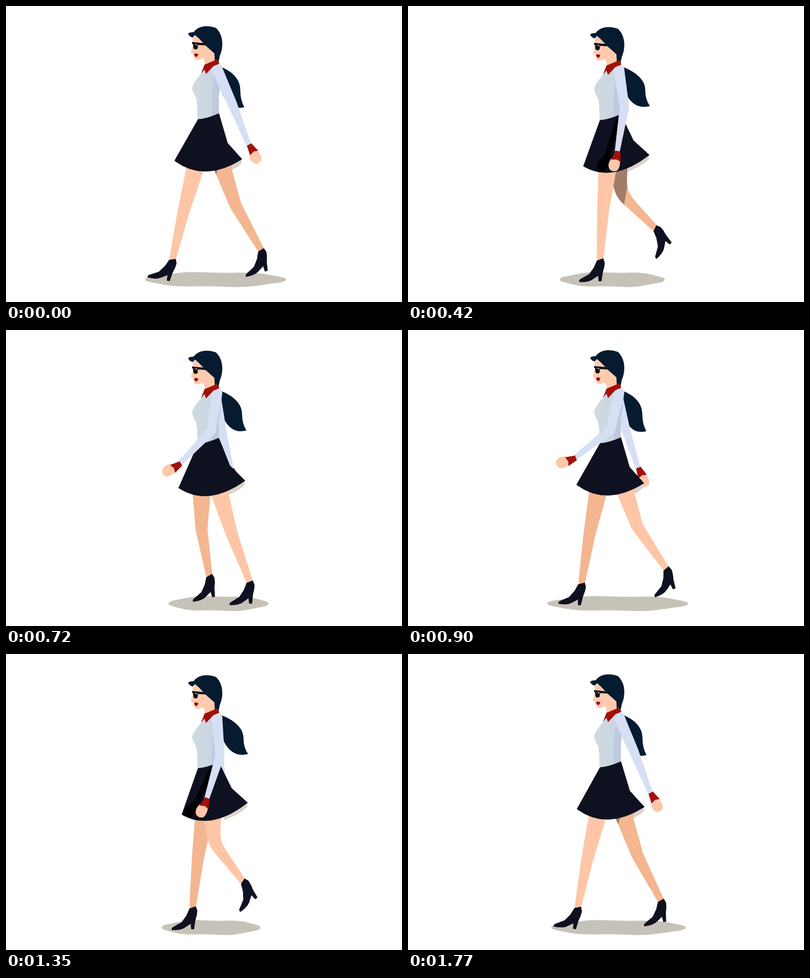
An HTML page with a canvas for the animation above (1800 ms loop, 800 px wide and 600 px high).

```html
<!DOCTYPE html>
<html lang="en">
<head>
<meta charset="utf-8">
<title>Walk cycle</title>
<style>
html, body { margin: 0; width: 100%; height: 100%; overflow: hidden; background: #fff; }
canvas { display: block; width: 800px; height: 600px; }
</style>
</head>
<body>
<canvas id="stage" width="800" height="600"></canvas>
<script>
const ctx = document.getElementById('stage').getContext('2d');
const { PI, sin, cos, hypot, atan2 } = Math;
const LOOP = 1800, STEP = 30, HIP_Y = 333, GROUND_Y = 514, FAR_LAG = 960;
const DEG = PI / 180;
const C = {
  ink: '#0e111f', hair: '#061a30', red: '#a21107', sleeve: '#d6dff4', shirtSide: '#bfc9df',
  face: '#fdcaae', nearSkin: '#fec6a6', farSkin: '#f4b690', hand: '#fdc7aa',
  legShade: '#a07c69', skirtShade: '#010104', ground: '#c7c2b8', hem: '#dad3ca'
};

const shapes = {
  boot: 'M-6 2 L6 -2 L9 6 L8 15 L5 26 L2.5 43.5 H-2.5 L-3.5 32 L-17 41 Q-25 46 -42 45 Q-43 41 -38 39 L-22 30 L-12 16 Z',
  cuff: 'M-4 -2 L6 -2 L11 18 L2 15 L-8 18 Z',
  hand: 'M-9 16 L9 14 Q13 29 8 37 Q-1 43 -8 37 Q-15 29 -9 16 Z',
  torso: 'M400 126 L393 139 Q376 158 376 167 Q377 175 384 186 Q387 200 387 232 L430 222 V180 Q436 145 436 126 L428 116 Z',
  shirtSide: 'M420 140 L416 180 V225 L430 222 V180 L434 150 Z',
  face: 'M384 58 L377 66 V83 L373 94 L378 97 L379 104 L383 109 H390 L398 106 L401 112 V122 L424 114 L422 90 L402 66 Z',
  lips: 'M380 97 L384 96 L389 98 L385 104 L381 101 Z',
  glasses: 'M376 73 L406 76 V80 L388 79 L387 86 Q386 88 383 88 Q379 88 378.5 84 L378 77 H376 Z',
  hair: 'M368 56 Q371 53 379 53 Q388 41 405 41 Q416 41 425 45 Q437 58 437 76 Q437 90 432 101 L429 116 L422 114 L421 96 L403 80 L390 66 L382 59 L377 64 Q369 61 368 56 Z',
  collar: 'M401 119 L427 108 L431 117 L419 122 L404 138 L401 129 L394 137 Z'
};
for (const name in shapes) shapes[name] = new Path2D(shapes[name]);

// Cosine that peaks at a given time.
const wave = (t, peak, period = LOOP) => cos(2 * PI * (t - peak) / period);

// Smooth hump from start to end, zero for the rest of the loop.
function hump(t, start, end) {
  const u = (((t - start) % LOOP) + LOOP) % LOOP / (end - start);
  return u < 1 ? sin(PI * u) ** 2 : 0;
}

function fill(path, color) {
  ctx.fillStyle = color;
  ctx.fill(path);
}

function ink(path) {
  fill(path, C.ink);
  ctx.strokeStyle = C.ink;
  ctx.lineWidth = 1;
  ctx.stroke(path);
}

function placed(x, y, angle, draw) {
  ctx.save();
  ctx.translate(x, y);
  ctx.rotate(angle);
  draw();
  ctx.restore();
}

// Unit vector at right angles to a-b.
function normal([ax, ay], [bx, by]) {
  const d = hypot(bx - ax, by - ay);
  return [(by - ay) / d, (ax - bx) / d];
}

const shift = ([x, y], [nx, ny], d) => [x + nx * d, y + ny * d];

// Stance carries the foot back, swing lifts it and bends the knee.
function pose(t) {
  const lift = 66 * hump(t, 640, 1740);
  const hip = [411 - 30 * wave(t, 50), HIP_Y];
  const x = 434 - 100 * wave(t, 150) + 12 * wave(t, 600) - 10 * wave(t, 150, LOOP / 2);
  const ankle = [x, GROUND_Y - lift];
  const k = 0.46 - 0.0022 * lift;
  const onLine = hip.map((v, i) => v + k * (ankle[i] - v));
  const knee = shift(onLine, normal(hip, ankle), -0.3 * lift - 2);
  const turn = 14 * hump(t, -160, 290) - 0.72 * lift;
  return { hip, knee, ankle, turn };
}

function legPath({ hip, knee, ankle }) {
  const n = normal(hip, ankle), m = normal(knee, ankle), p = new Path2D();
  const edge = s => [[hip[0] + 18 * s, HIP_Y], shift(knee, n, 12 * s), shift(ankle, m, 6.5 * s)];
  const [lh, lk, la] = edge(-1), [rh, rk, ra] = edge(1);
  p.moveTo(lh[0], HIP_Y - 15);
  p.lineTo(...lh);
  p.arcTo(...lk, ...la, 60);
  p.lineTo(...la);
  p.lineTo(...ra);
  p.arcTo(...rk, ...rh, 60);
  p.lineTo(...rh);
  p.lineTo(rh[0], HIP_Y - 15);
  p.closePath();
  return p;
}

function drawBoot({ ankle, turn }) {
  placed(...ankle, turn * DEG, () => ink(shapes.boot));
}

// Both joints swing like pendulums; angles in degrees from straight down.
function swingArm(shoulder, radius, upper, fore) {
  const reach = ([x, y], [length, angle]) =>
    [x + length * sin(angle * DEG), y + length * cos(angle * DEG)];
  const elbow = reach(shoulder, upper), wrist = reach(elbow, fore);
  const n = normal(shoulder, elbow), b = normal(shoulder, wrist), m = normal(elbow, wrist);
  const a = atan2(n[1], n[0]), path = new Path2D();
  path.arc(...shoulder, radius, a + PI, a + 2 * PI);
  path.lineTo(...shift(elbow, b, radius - 1.5));
  path.lineTo(...shift(wrist, m, 5));
  path.lineTo(...shift(wrist, m, -5));
  path.lineTo(...shift(elbow, b, 1.5 - radius));
  path.closePath();
  return { path, wrist, turn: -1.33 * fore[1] * DEG };
}

function drawArm(arm, shade) {
  fill(arm.path, shade || C.sleeve);
  placed(...arm.wrist, arm.turn, () => {
    fill(shapes.hand, shade || C.hand);
    fill(shapes.cuff, shade || C.red);
  });
}

// Ellipse with a rippled rim.
function drawGround(l, r) {
  const p = new Path2D();
  for (let a = 0; a < 2 * PI; a += PI / 40) {
    const rise = 15 * sin(a) * (1 + 0.08 * sin(6 * a + 1));
    p.lineTo((l + r) / 2 + (r - l) / 2 * cos(a), 554.5 + rise);
  }
  fill(p, C.ground);
}

function drawTail(s) {
  const p = new Path2D(), x = 473 + 7 * s, tip = 481 + 8.5 * s;
  p.moveTo(432, 123);
  p.bezierCurveTo(455, 131, x, 147, x, 170);
  p.quadraticCurveTo(x, 190, tip, 205 - 2.5 * s);
  p.bezierCurveTo(tip - 24, 212 - 2.5 * s, 441 + 4 * s, 196, 432 + 2.5 * s, 163);
  p.closePath();
  fill(p, C.hair);
}

function skirtPaths(s) {
  const [lx, ly, rx, ry, bob] = [340 + 16 * s, 313 + 13 * s, 476 + 12.5 * s, 311 - 10 * s, 2 * s];
  const skirt = new Path2D(), hem = new Path2D();
  skirt.moveTo(388, 230 + bob);
  skirt.quadraticCurveTo(405, 229 + bob, 430, 218 + bob);
  skirt.lineTo(447 + 9 * s, 278 - 6 * s);
  skirt.lineTo(rx, ry);
  skirt.quadraticCurveTo((lx + rx) / 2 - 8, (ly + ry) / 2 + 46, lx, ly);
  skirt.closePath();
  hem.moveTo(rx - 2, ry);
  hem.lineTo(rx, ry + 7);
  hem.quadraticCurveTo(rx - 12, ry + 22, 440, 337);
  hem.lineTo(440, 322);
  return { skirt, hem };
}

function drawTorso() {
  const g = ctx.createLinearGradient(376, 0, 432, 0);
  g.addColorStop(0, '#d0dae0');
  g.addColorStop(1, '#c9d4e3');
  fill(shapes.torso, g);
  fill(shapes.shirtSide, C.shirtSide);
}

function drawHead() {
  fill(shapes.face, C.face);
  fill(shapes.lips, '#8e1010');
  fill(shapes.glasses, '#0a0a12');
  ctx.strokeStyle = '#d8d8de';
  ctx.lineWidth = 1;
  ctx.stroke(new Path2D('M381 77.5 H386 L385.5 81'));
  fill(shapes.hair, C.hair);
}

function draw(t) {
  const near = pose(t), far = pose(t - FAR_LAG);
  const nearPath = legPath(near), farPath = legPath(far);
  const sway = (1 - wave(t, 60, LOOP / 2)) / 2, bob = 2 * sway;
  const swing = wave(t, 15), counter = wave(t, 960);
  const arm = swingArm([426, 127 + bob], 11, [77, 5.6 + 18 * swing], [92, -15 + 37 * swing]);
  const farArm = swingArm([425, 140], 10, [67, 3 + 11 * counter], [80, 4 + 14 * counter]);
  const { skirt, hem } = skirtPaths(sway);

  ctx.fillStyle = '#fff';
  ctx.fillRect(0, 0, 800, 600);
  drawGround(298 - 41 * wave(t, 165, LOOP / 2), 540 + 32 * wave(t, 90, LOOP / 2));
  drawTail(sway);
  drawArm(farArm);
  fill(hem, C.hem);

  fill(farPath, C.farSkin);
  ctx.save();
  ctx.clip(farPath);
  ctx.translate(28, 0);
  fill(nearPath, C.legShade);
  ctx.restore();
  drawBoot(far);
  fill(nearPath, C.nearSkin);
  drawBoot(near);

  placed(0, bob, 0, drawTorso);
  ink(skirt);
  // The arm's shadow slants away from the sleeve.
  ctx.save();
  ctx.clip(skirt);
  ctx.transform(1, 0, -0.2, 1, 41, 0);
  drawArm(arm, C.skirtShade);
  ctx.restore();

  placed(0, bob, 0, drawHead);
  drawArm(arm);
  placed(0, bob, 0, () => fill(shapes.collar, C.red));
}

function tick() {
  const t = performance.now() % LOOP;
  draw(Math.floor(t / STEP) * STEP);
  requestAnimationFrame(tick);
}
tick();
</script>
</body>
</html>
```
